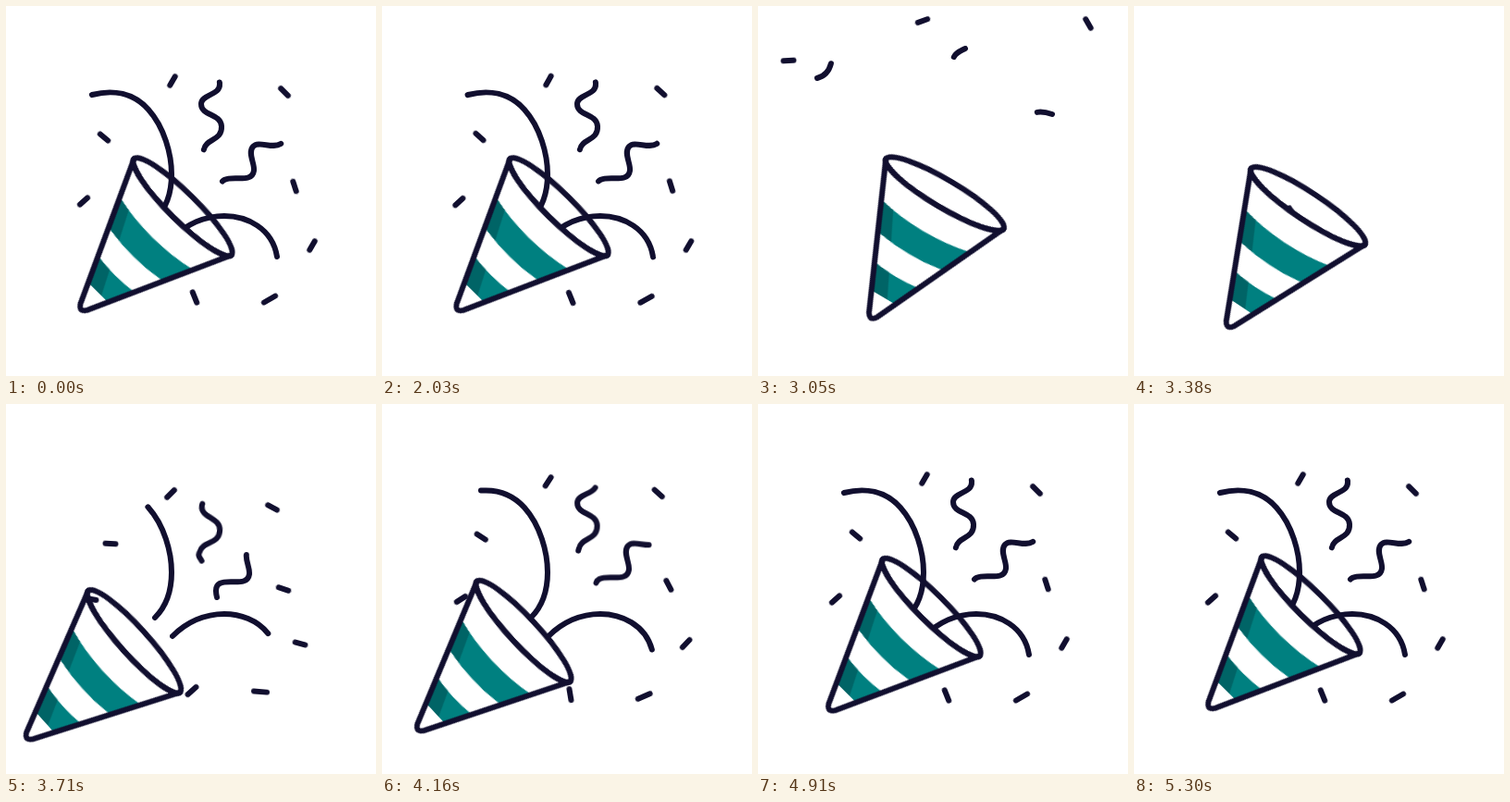
Recreate the animation shown at these times as an HTML page without scripts. Size 400 by 400 pixels, loop 5360 ms.

```html
<!DOCTYPE html>
<html lang="en">
<head>
<meta charset="utf-8">
<title>Party popper</title>
<style>
  html, body { margin: 0; width: 100%; height: 100%; overflow: hidden; background: #fff; }
  svg { display: block; width: 100%; height: 100%; }

  .ink { stroke: #110f2f; stroke-width: 6; stroke-linecap: round; stroke-linejoin: round; }
  .paper { fill: #fff; }
  .line { fill: none; }

  .cone { transform-origin: 139px 166px; animation: recoil 5.36s infinite; }
  .dash, .ribbon { --gone: late; }
  .dash { animation: fly 5.36s infinite, var(--gone) 5.36s step-end infinite; }
  .ribbon { transform-origin: 219px 132px; animation: slide 5.36s infinite, var(--gone) 5.36s step-end infinite; }
  .early { --gone: early; }

  /* Tilt back, kick down-left, then drift home */
  @keyframes recoil {
    0%, 37.7% { transform: translate(0, 0) rotate(0deg); animation-timing-function: cubic-bezier(.4, .2, .7, .8); }
    57.46% { transform: translate(0, 0) rotate(-14.3deg); animation-timing-function: ease-out; }
    60.3% { transform: translate(0, 0) rotate(-15deg); animation-timing-function: cubic-bezier(.5, 0, .7, .8); }
    66.4% { transform: translate(-45px, 40px) rotate(0deg); animation-timing-function: ease-out; }
    68.3% { transform: translate(-50px, 37px) rotate(3.3deg); animation-timing-function: cubic-bezier(.4, .1, .46, 1); }
    98.9%, 100% { transform: translate(0, 0) rotate(0deg); }
  }

  @keyframes fly {
    0%, 37.7% { transform: var(--rest); animation-timing-function: cubic-bezier(.3, .1, .6, .78); }
    45.71% { transform: var(--out); animation-timing-function: cubic-bezier(.2, .5, .5, 1); }
    57.46% { transform: var(--end); animation-timing-function: step-end; }
    63% { transform: translate(150px, 235px) rotate(0deg); animation-timing-function: cubic-bezier(.15, .5, .5, .95); }
    69.22% { transform: var(--burst); animation-timing-function: cubic-bezier(.2, .6, .4, 1); }
    88%, 100% { transform: var(--rest); }
  }

  /* Each ribbon shows a window of its path: a start and a length */
  @keyframes slide {
    0%, 37.7% {
      stroke-dasharray: var(--len0) 999px; stroke-dashoffset: var(--from0); transform: translate(0, 0) rotate(0deg);
      animation-timing-function: cubic-bezier(.4, .1, .7, .8);
    }
    45.71% {
      stroke-dasharray: var(--len1) 999px; stroke-dashoffset: var(--from1); transform: translate(0, 0) rotate(0deg);
      animation-timing-function: cubic-bezier(.3, .3, .6, 1);
    }
    57.2% {
      stroke-dasharray: var(--len2) 999px; stroke-dashoffset: var(--from2); transform: translate(0, 0) rotate(0deg);
      animation-timing-function: step-end;
    }
    63% {
      stroke-dasharray: 1px 999px; stroke-dashoffset: 0px; transform: var(--origin, translate(0, 0) rotate(0deg));
      animation-timing-function: cubic-bezier(.15, .5, .5, .95);
    }
    69.22% {
      stroke-dasharray: var(--len3) 999px; stroke-dashoffset: 0px; transform: var(--near, translate(0, 0) rotate(0deg));
      animation-timing-function: cubic-bezier(.2, .6, .4, 1);
    }
    90%, 100% { stroke-dasharray: var(--len0) 999px; stroke-dashoffset: var(--from0); transform: translate(0, 0) rotate(0deg); }
  }

  @keyframes late { 0% { opacity: 1; } 59% { opacity: 0; } 63% { opacity: 1; } }
  @keyframes early { 0% { opacity: 1; } 54.5% { opacity: 0; } 63% { opacity: 1; } }
</style>
</head>
<body>
<svg viewBox="0 0 400 400">
  <defs>
    <path id="body" d="M-74 0L-5 152Q0 160 5 152L74 0A74 15 0 0 1 -74 0z"/>
    <clipPath id="bodyClip"><use href="#body"/></clipPath>
    <path id="stripes" d="M-57 40Q0 53 57 40L41 72Q0 79 -41 72zM-28 102Q0 106 28 102L15 130Q0 130 -15 130z"/>
    <clipPath id="stripeClip"><use href="#stripes"/></clipPath>
  </defs>

  <g class="cone">
    <ellipse class="ink paper" rx="74" ry="15" transform="translate(191 217.3) rotate(44.7)"/>
  </g>

  <g class="ink line">
    <path class="ribbon"
      style="--from0:0px;--len0:196px;--from1:-101px;--len1:147px;--from2:-371px;--len2:25px;--len3:130px"
      d="M161 231C172 220 179 203 179 182C179 160 171 131 154 112C138 94 116 90 93 96C80 101 60 102 43 94C20 84 15 45 45 38C70 34 84 50 79 62C77 70 72 76 64 78"/>
    <path class="ribbon early"
      style="--from0:0px;--len0:141px;--from1:-109px;--len1:89px;--from2:-236px;--len2:2px;--len3:116px"
      d="M180 251C195 236 215 227 236 227C260 227 288 240 293 271C297 292 293 312 285 326C278 340 270 350 260 360"/>
    <path class="ribbon"
      style="--from0:-11px;--len0:101px;--from1:-21px;--len1:97px;--from2:-148px;--len2:18px;--len3:81px;--near:translate(-2px,5px) rotate(6deg);--origin:translate(-45px,60px) rotate(6deg)"
      d="M217 165C214 161 212 160 214 155C216 143 234 146 233 130C232 116 211 119 211 106C211 95 232 97 231 84C231 72 210 72 211 58C212 51 218 49 224 46"/>
    <path class="ribbon"
      style="--from0:-14px;--len0:97px;--from1:-28px;--len1:91px;--from2:-147px;--len2:18px;--len3:74px;--near:translate(-5px,6px) rotate(0deg);--origin:translate(-60px,45px) rotate(0deg)"
      d="M233 203C231 195 232 190 236 188C246 183 266 192 268 178C269 170 261 159 267 152C273 145 288 155 297 149C304 143 294 120 301 115C306 114 312 115 318 117"/>

    <path class="dash early" d="M-5.5 0h11" style="--rest:translate(84px,211px) rotate(-42deg);--out:translate(14px,280px) rotate(-110deg);--end:translate(8px,285px) rotate(-130deg);--burst:translate(92px,211px) rotate(10deg)"/>
    <path class="dash" d="M-5.5 0h11" style="--rest:translate(106px,142px) rotate(40deg);--out:translate(50px,79px) rotate(265deg);--end:translate(33px,59px) rotate(357deg);--burst:translate(113px,151px) rotate(3deg)"/>
    <path class="dash" d="M-5.5 0h11" style="--rest:translate(180px,81px) rotate(-60deg);--out:translate(178px,33px) rotate(-165deg);--end:translate(178px,16px) rotate(-200deg);--burst:translate(178px,97px) rotate(-45deg)"/>
    <path class="dash" d="M-5.5 0h11" style="--rest:translate(301px,93px) rotate(45deg);--out:translate(339px,42px) rotate(-205deg);--end:translate(357px,19px) rotate(-300deg);--burst:translate(288px,112px) rotate(28deg)"/>
    <path class="dash early" d="M-5.5 0h11" style="--rest:translate(312px,195px) rotate(72deg);--out:translate(370px,152px) rotate(152deg);--end:translate(389px,139px) rotate(180deg);--burst:translate(300px,200px) rotate(18deg)"/>
    <path class="dash early" d="M-5.5 0h11" style="--rest:translate(331px,259px) rotate(-60deg);--out:translate(383px,254px) rotate(-8deg);--end:translate(400px,252px) rotate(10deg);--burst:translate(318px,259px) rotate(15deg)"/>
    <path class="dash early" d="M-7 0h14" style="--rest:translate(285px,317px) rotate(-30deg);--out:translate(342px,348px) rotate(70deg);--end:translate(361px,358px) rotate(100deg);--burst:translate(275px,311px) rotate(5deg)"/>
    <path class="dash early" d="M-6 0h12" style="--rest:translate(204px,315px) rotate(68deg);--out:translate(229px,370px) rotate(58deg);--end:translate(237px,386px) rotate(50deg);--burst:translate(201px,310px) rotate(138deg)"/>
  </g>

  <g class="cone">
    <g transform="translate(191 217.3) rotate(44.7)">
      <use href="#body" class="paper"/>
      <g clip-path="url(#bodyClip)">
        <use href="#stripes" fill="#008080"/>
        <path d="M-74 0H-61L5 130H-15z" fill="#006466" clip-path="url(#stripeClip)"/>
      </g>
      <use href="#body" class="ink line"/>
    </g>
  </g>
</svg>
</body>
</html>
```
